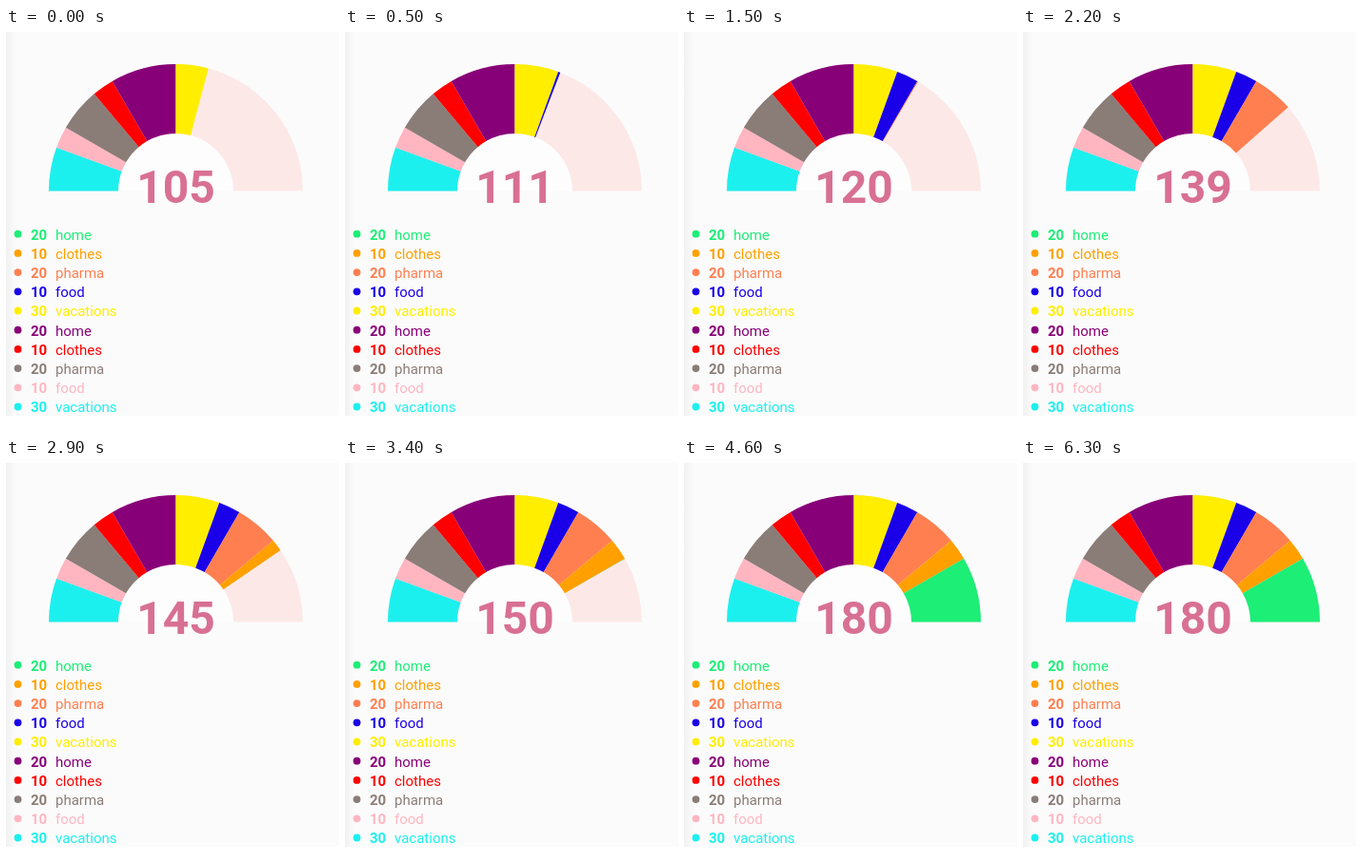
These frames come from a looping animation (350 by 424 pixels, 7000 ms). An HTML page:

```html
<!DOCTYPE html>
<html lang="en">
<head>
<meta charset="utf-8">
<title>Half donut chart</title>
<style>
  html, body { margin: 0; width: 100%; height: 100%; overflow: hidden; background: #fff; }
  svg { display: block; width: 350px; height: 424px; font-family: Roboto, sans-serif; }
  .total { font-size: 48px; font-weight: 700; fill: #d87093; text-anchor: middle; }
  .row { font-size: 15px; }
  .row .amount { font-weight: 700; }
</style>
</head>
<body>
<svg id="stage" viewBox="0 0 350 424">
  <defs>
    <linearGradient id="edge">
      <stop offset="0" stop-color="#f1f1f1"/>
      <stop offset="1" stop-color="#fbfbfb"/>
    </linearGradient>
  </defs>
  <rect y="4" width="350" height="404" fill="#fbfbfb"/>
  <rect y="4" width="10" height="404" fill="url(#edge)"/>
</svg>
<script>
const LOOP = 7000, STEP = 100;
const CX = 178.5, CY = 171.5, OUTER = 133.5, INNER = 60.5;

// Legend rows from top to bottom: amount, label, colour
const rows = [
  [20, 'home', '#1cee76'], [10, 'clothes', '#ffa000'], [20, 'pharma', '#ff7f50'],
  [10, 'food', '#1a00e8'], [30, 'vacations', '#ffee00'], [20, 'home', '#880078'],
  [10, 'clothes', '#ff0000'], [20, 'pharma', '#8a7d78'], [10, 'food', '#ffb6c1'],
  [30, 'vacations', '#1cf0ee']
];

// Slices run from the last colour to the first
const spans = [20, 10, 20, 10, 30, 20, 10, 20, 10, 30];

// Sweeps of the slices that grow: degrees, start, duration
const sweeps = [
  [20, -520, 810], [10, 280, 1000], [20, 1400, 980],
  [10, 2385, 980], [30, 3365, 1000]
];

const stage = document.getElementById('stage');

function add(tag, attrs, text = '') {
  const node = document.createElementNS('http://www.w3.org/2000/svg', tag);
  for (const key in attrs) node.setAttribute(key, attrs[key]);
  node.textContent = text;
  return stage.appendChild(node);
}

function point(radius, deg) {
  const a = deg * Math.PI / 180;
  return `${(CX - radius * Math.cos(a)).toFixed(2)} ${(CY - radius * Math.sin(a)).toFixed(2)}`;
}

function ring(from, to) {
  if (to <= from) return '';
  return `M${point(OUTER, from)}A${OUTER} ${OUTER} 0 0 1 ${point(OUTER, to)}` +
    `L${point(INNER, to)}A${INNER} ${INNER} 0 0 0 ${point(INNER, from)}Z`;
}

const easeInOut = p => p < 0.5 ? 2 * p * p : 1 - 2 * (1 - p) ** 2;
const clamp = p => Math.min(1, Math.max(0, p));

add('circle', { cx: CX, cy: CY, r: INNER, fill: '#fdfdfe' });
add('rect', { x: CX - INNER, y: CY, width: 2 * INNER, height: INNER, fill: '#fbfbfb' });
add('path', { d: ring(0, 180), fill: '#fce9e7' });

let angle = 0;
const slices = spans.map((span, i) => {
  const from = angle;
  angle += span;
  const fill = rows[rows.length - 1 - i][2];
  return { from, to: angle, node: add('path', { fill }) };
});

const total = add('text', { class: 'total', x: CX, y: 183.5 });

rows.forEach(([amount, label, fill], i) => {
  const y = 217 + i * 20.2;
  add('circle', { cx: 12.5, cy: y - 0.3, r: 3.9, fill });
  add('text', { class: 'row', x: 52, y: y + 5.5, fill }, label);
  add('text', { class: 'row', x: 26, y: y + 5.5, fill, 'font-weight': 700 }, amount);
});

function draw(time) {
  const t = Math.floor(time % LOOP / STEP) * STEP;
  const value = sweeps.reduce((sum, [deg, start, dur]) =>
    sum + deg * easeInOut(clamp((t - start) / dur)), 90);
  for (const { from, to, node } of slices) {
    node.setAttribute('d', ring(from, Math.min(to, value)));
  }
  total.textContent = Math.round(value);
}

const origin = performance.now();
function tick() {
  draw(performance.now() - origin);
  requestAnimationFrame(tick);
}
tick();
</script>
</body>
</html>
```
